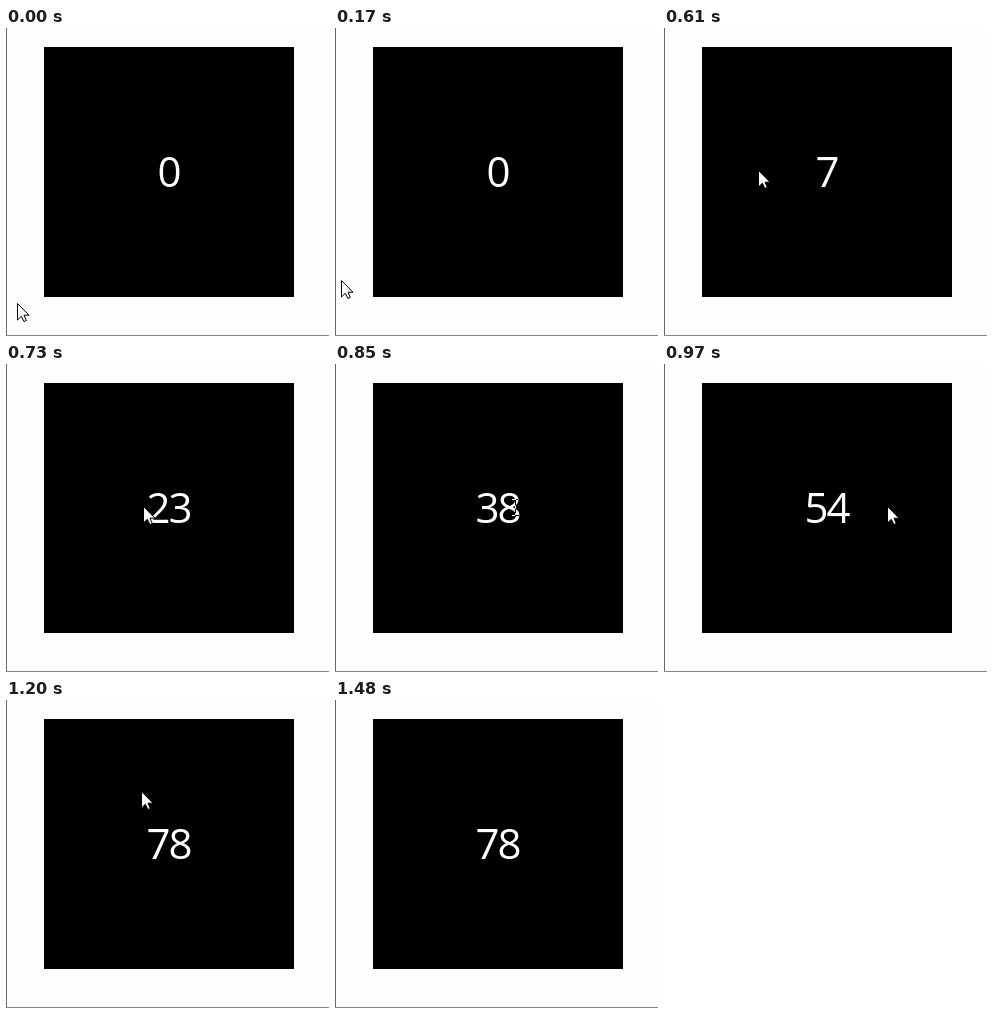
Write an HTML page with a canvas that moves like this. It is 323 px wide and 308 px high and loops after 1910 ms.

```html
<!DOCTYPE html>
<html lang="en">
<head>
<meta charset="utf-8">
<title>Mouse move counter</title>
<style>
html, body { margin: 0; width: 100%; height: 100%; overflow: hidden; background: #fefefe; }
canvas { display: block; }
</style>
</head>
<body>
<canvas width="323" height="308"></canvas>
<script>
const ctx = document.querySelector('canvas').getContext('2d');
const LOOP = 1910;
const EXIT = 1480;

const arrow = new Path2D('M.5 .5V17L4.3 13.3L6.9 18.5L9.3 17.5L7 12.2H12Z');

const bezier = (a, b, c, d, u) => {
  const v = 1 - u;
  return v * v * v * a + 3 * v * v * u * b + 3 * v * u * u * c + u * u * u * d;
};

// Three pointer gestures, each refreshed at its own pace
const gestures = [
  { // curve up and into the box
    start: 0, pace: 610 / 11,
    at: t => [bezier(11, 17, -46, 94, t / 610), bezier(275, 275, 150, 142, t / 610)],
  },
  { // steady sweep to the right
    start: 610, pace: 60,
    at: t => [94 + (t - 610) * 0.358, 142],
  },
  { // flick to the upper left, then out at the right edge
    start: 1150, pace: 55,
    at: t => {
      const away = Math.abs(t - 1205);
      return [135 + away * 0.8, 91 + away * 0.46];
    },
  },
];

function countAt(t) {
  return Math.max(0, Math.min(78, Math.round(7.1 + (t - 610) * 0.13)));
}

function rect(color, x, y, w, h) {
  ctx.fillStyle = color;
  ctx.fillRect(x, y, w, h);
}

function drawArrow(x, y) {
  ctx.save();
  ctx.translate(x, y);
  ctx.fillStyle = '#fff';
  ctx.strokeStyle = '#000';
  ctx.fill(arrow);
  ctx.stroke(arrow);
  ctx.restore();
}

function drawTextCursor(x, y) {
  ctx.save();
  ctx.globalCompositeOperation = 'difference';
  rect('#fff', x, y - 6, 1, 15);
  for (const edge of [y - 7, y + 9]) {
    rect('#fff', x - 3, edge, 3, 1);
    rect('#fff', x + 1, edge, 3, 1);
  }
  ctx.restore();
}

function draw(now) {
  const { start, pace, at } = gestures.findLast(g => g.start <= now);
  // 6 ms of slack absorbs rounding of the refresh times
  const t = start + Math.floor((now - start + 6) / pace) * pace;

  rect('#fefefe', 0, 0, 323, 308);
  rect('#696969', 0, 0, 1, 308);
  rect('#868686', 0, 307, 323, 1);
  rect('#000', 38, 19, 250, 250);

  ctx.fillStyle = '#fff';
  ctx.font = '42px "Open Sans", "Noto Sans", sans-serif';
  ctx.letterSpacing = '-2px';
  ctx.textAlign = 'center';
  ctx.fillText(countAt(t), 162.5, 159);

  if (now >= EXIT) return;
  const [x, y] = at(t).map(Math.round);
  const overText = x >= 141 && x <= 185 && y >= 118 && y <= 170;
  (overText ? drawTextCursor : drawArrow)(x, y);
}

function frame() {
  draw(performance.now() % LOOP);
  requestAnimationFrame(frame);
}
frame();
</script>
</body>
</html>
```
